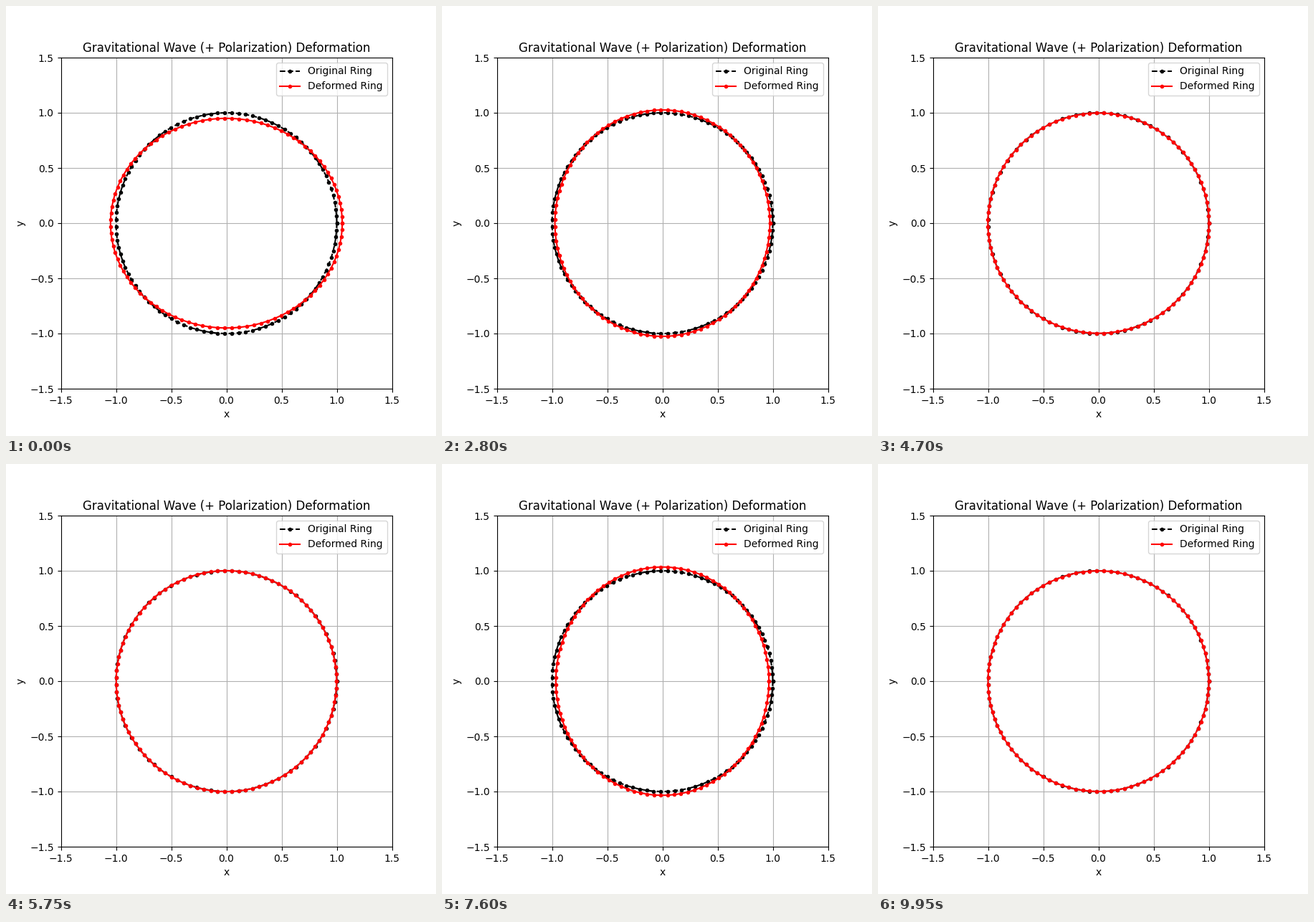
Animation, 600 px wide and 600 px high, one loop 10000 ms. Source, as a matplotlib script:

```python
import numpy as np
import matplotlib.pyplot as plt
from matplotlib.animation import FuncAnimation

FRAMES = 200
INTERVAL = 50      # ms per frame
STRAIN = 0.1       # peak wave amplitude
PHASE_STEP = 0.15  # radians per frame

theta = np.linspace(0, 2 * np.pi, 100)
ring_x, ring_y = np.cos(theta), np.sin(theta)


def deform(frame):
    """Stretch one axis and squeeze the other by half the strain."""
    half = STRAIN * np.cos(PHASE_STEP * frame) / 2
    return ring_x * (1 + half), ring_y * (1 - half)


fig, ax = plt.subplots(figsize=(6, 6), dpi=100)
ax.set_aspect("equal")
ax.set_xlim(-1.5, 1.5)
ax.set_ylim(-1.5, 1.5)
ax.set_xlabel("x")
ax.set_ylabel("y")
ax.set_title("Gravitational Wave (+ Polarization) Deformation")
ax.grid(True)

ax.plot(ring_x, ring_y, "k--o", markersize=3, label="Original Ring")
wave_ring, = ax.plot(*deform(0), "r-o", markersize=3, label="Deformed Ring")
ax.legend(loc="upper right")


def update(frame):
    wave_ring.set_data(*deform(frame))
    return wave_ring,


anim = FuncAnimation(fig, update, frames=FRAMES, interval=INTERVAL,
                     repeat=True, repeat_delay=0)
plt.show()
```
